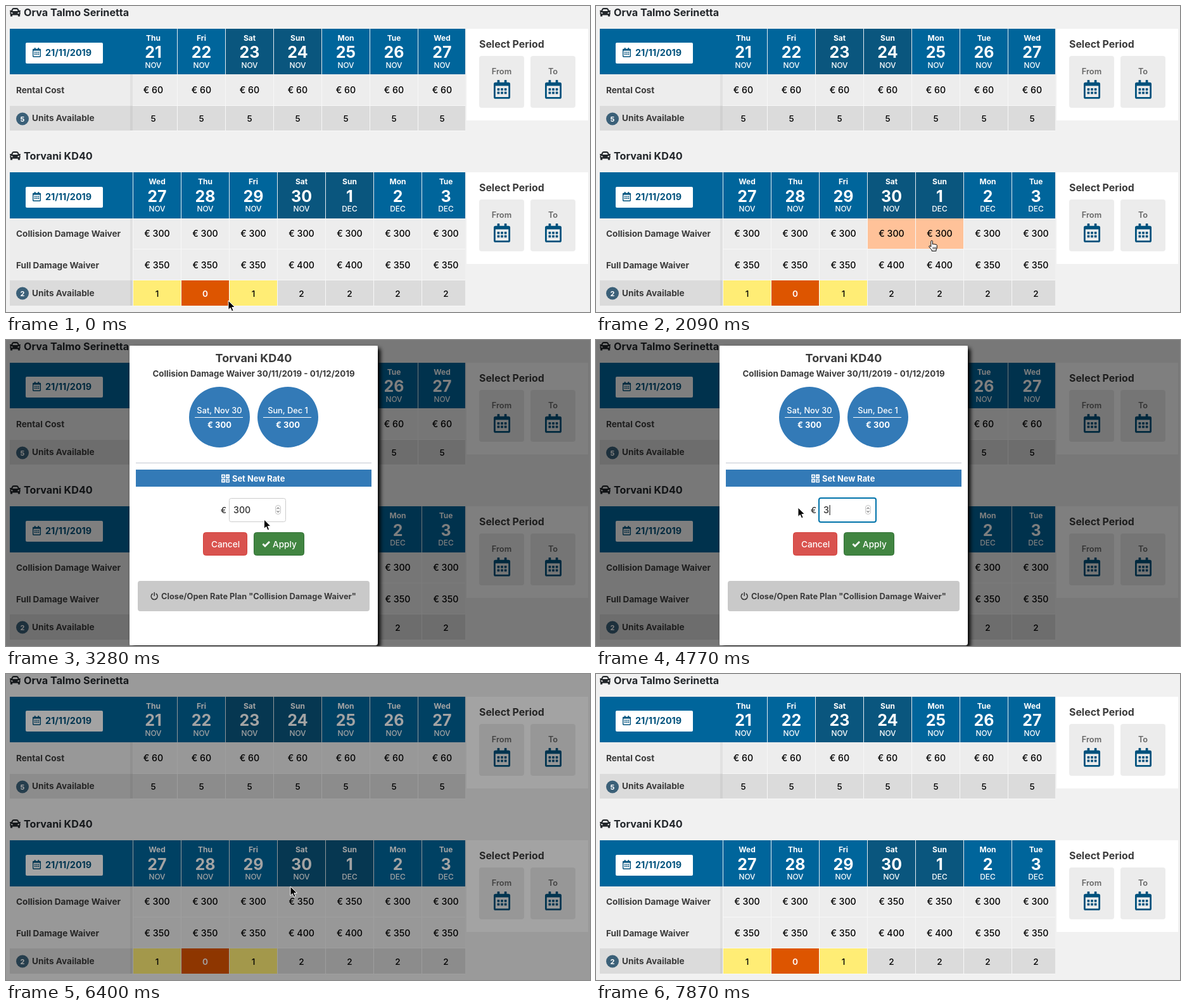
These frames come from a looping animation (922 px wide and 484 px high, 8.16 s). An HTML page:

```html
<!DOCTYPE html>
<html lang="en">
<head>
<meta charset="utf-8">
<title>Rental rate calendar</title>
<style>
html, body { margin: 0; width: 100%; height: 100%; overflow: hidden; background: #f1f1f1; }
svg { display: block; font-family: Inter, sans-serif; }
text { white-space: pre; }
</style>
</head>
<body>
<svg id="stage" width="922" height="484" viewBox="0 0 922 484"></svg>
<script>
const LOOP = 8160, COL = 76, CELLS_X = 201, RIGHT = 725;
const BLUE = '#00659b', WEEKEND = '#0a567e', INK = '#3b3b3b', MODAL_BLUE = '#337ab7';
const CAR = 'Torvani KD40', PLAN = 'Collision Damage Waiver';

const rect = (x, y, w, h, fill, extra = '') =>
  `<rect x="${x}" y="${y}" width="${w}" height="${h}" fill="${fill}" ${extra}/>`;
const text = (x, y, str, size, weight = 400, fill = '#000', anchor = 'start', id = '') =>
  `<text x="${x}" y="${y}" font-size="${size}" font-weight="${weight}" fill="${fill}" text-anchor="${anchor}" id="${id}">${str}</text>`;
const mid = (x, y, str, size, weight, fill, id) => text(x, y, str, size, weight, fill, 'middle', id);
const path = (d, fill, extra = '') => `<path d="${d}" fill="${fill}" ${extra}/>`;
const at = (x, y, scale, content) => `<g transform="translate(${x} ${y}) scale(${scale})">${content}</g>`;

const carIcon = path('M0 4h2.4l.7-1.8Q4 0 6.400 0h4.200Q13 0 13.900 2.200l.7 1.800H17v1.400h-1q.6.6.6 1.600v2.400q0 .8-.5 1.400v2.600h-3.200v-2H4.100v2H.9v-2.600Q.4 10 .4 9.400V7q0-1 .6-1.600H0z' +
  'M5 3 4.300 5h8.400L12 3q-.3-.8-1.200-.8H6.200Q5.300 2.200 5 3z' +
  'M2 7.700q.3-1 1.500-.6 1.400.8 1.200 2-3 .4-2.700-1.400zM15 7.700q-.3-1-1.500-.6-1.400.8-1.200 2 3 .4 2.700-1.400z', '#23272b', 'fill-rule="evenodd"');

function calendarIcon(x, y, scale) {
  const color = '#00527d';
  let s = rect(.75, 2.75, 12.5, 12.5, 'none', `rx=".8" stroke="${color}" stroke-width="1.5"`) + rect(.5, 2.5, 13, 2.5, color);
  for (const px of [3, 9]) s += rect(px, 0, 2, 3, color, 'rx=".4"');
  for (let i = 0; i < 6; i++) s += rect(3 + i % 3 * 3, 7 + (i > 2) * 3, 2, 2, color, 'rx=".35"');
  return at(x, y, scale, s);
}

// The page is built in two layers so that cell highlights sit below the text.
let shapes = '', labels = '';

function section(top, title, firstX, days, weekendCol, rows) {
  const headEnd = rows[0].y, headH = headEnd - top;
  labels += at(6, top - 33, 1, carIcon) + text(28, top - 20, title, 16.2, 700, '#23272b');
  shapes += rect(6, top, RIGHT - 6, headH, BLUE);
  const colX = c => firstX + c * COL;
  days.forEach(([day, num, month], c) => {
    const x = colX(c), cx = x + 37.5;
    if (c == weekendCol || c == weekendCol + 1) shapes += rect(x, top, COL - 1, headH, WEEKEND);
    if (x > 200) shapes += rect(x - 1, top, 1, headH, '#e4ecf1');
    labels += mid(cx, top + 19, day, 12, 700, '#fff') + mid(cx, headEnd - 26.5, num, 25, 700, '#fff') +
      mid(cx, top + 62, month, 11.9, 500, '#fff');
  });
  shapes += rect(31, headEnd - 50, 122, 33, '#fff', 'rx="2"');
  labels += calendarIcon(42, headEnd - 42, .93) + text(62, headEnd - 29, '21/11/2019', 14.4, 700, '#00527d');

  rows.forEach(({ name, y, h, base, values, badge }, r) => {
    const fill = badge ? '#dbdbdb' : '#ededed';
    shapes += rect(196, y, RIGHT - 196, h + 1, '#f7f7f7');
    values.forEach((value, c) => {
      const x = colX(c);
      const tint = badge == 2 && ['#ffed75', '#dd5500', '#ffed75'][c] || fill;
      shapes += rect(x, y, Math.min(COL - 1, RIGHT - x), h, tint);
      labels += mid(x + 37.5, base, value, badge ? 13.6 : 14.2,
        value === 0 ? 600 : 500, value === 0 ? '#fff' : '#000', badge ? '' : `v${top}-${r}-${c}`);
    });
    shapes += rect(6, y, 194, h + (badge ? 0 : 1), fill) + rect(196, y, 4, h + (badge ? 0 : 1), '#000', 'opacity=".05"');
    if (badge) {
      labels += `<circle cx="26" cy="${y + 20.5}" r="10" fill="#3b6078"/>` + mid(26, y + 24.5, badge, 11, 700, '#fff');
    }
    labels += text(badge ? 41 : 16, badge ? base - 1 : base, name, 13.6, 700, INK);
  });

  shapes += rect(727, top, 192, 145, '#fff');
  labels += text(747, top + 30, 'Select Period', 15.9, 700, INK);
  ['From', 'To'].forEach((name, i) => {
    const x = 747 + i * 81;
    shapes += rect(x, top + 43, 71, 82, '#ececec', 'rx="4"');
    labels += mid(x + 35.5, top + 72, name, 12.8, 600, '#666') + calendarIcon(x + 23, top + 81, 1.86);
  });
}

const week = (names, first, month) => names.split(' ').map((d, i) => [d, first + i, month]);
const nov = week('Thu Fri Sat Sun Mon Tue Wed', 21, 'NOV');
const turn = [...week('Wed Thu Fri Sat', 27, 'NOV'), ...week('Sun Mon Tue', 1, 'DEC')];

section(36, 'Orva Talmo Serinetta', 195, nov, 2, [
  { name: 'Rental Cost', y: 108, h: 49, base: 138, values: Array(7).fill('€ 60') },
  { name: 'Units Available', y: 158, h: 39, base: 183, values: Array(7).fill(5), badge: 5 }
]);
section(263, CAR, CELLS_X, turn, 3, [
  { name: PLAN, y: 336, h: 48, base: 365, values: Array(7).fill('€ 300') },
  { name: 'Full Damage Waiver', y: 385, h: 48, base: 415, values: turn.map((d, c) => c == 3 || c == 4 ? '€ 400' : '€ 350') },
  { name: 'Units Available', y: 434, h: 40, base: 460, values: [1, 0, 1, 2, 2, 2, 2], badge: 2 }
]);

const dayCircle = (x, label) => `<circle cx="${x}" cy="122" r="48" fill="${MODAL_BLUE}"/>` +
  mid(x, 116, label, 12.8, 500, '#fff') + rect(x - 39, 122, 76, 1, '#fff') + mid(x, 139, '€ 300', 13, 700, '#fff');
const stroke = (color, width) => `stroke="${color}" stroke-width="${width}" stroke-linecap="round"`;
const rateIcon = [0, 1, 2, 3].map(i => rect(340 + i % 2 * 7, 212.5 + (i > 1) * 7, 6, 6, '#fff', 'rx=".8"')).join('') +
  path('M341.500 215.500h3M343 214v3M348.500 215.500h3M341.800 221.300l2.400 2.400M344.200 221.300l-2.400 2.400M348.500 221.500h3M348.500 223.500h3', 'none', stroke(MODAL_BLUE, 1));

const modal = rect(195, 9, 392, 474, '#fff', 'rx="4" style="filter:drop-shadow(4px 4px 3px #000)"') +
  mid(391, 35, CAR, 18, 700, INK) +
  mid(391, 58, PLAN + ' 30/11/2019 - 01/12/2019', 13.3, 700, INK) +
  dayCircle(337, 'Sat, Nov 30') + dayCircle(445, 'Sun, Dec 1') +
  rect(205, 194, 372, 1, '#c3c7d0') +
  rect(205, 205, 372, 27, MODAL_BLUE) + rateIcon + text(357, 224, 'Set New Rate', 12.9, 700, '#fff') +
  text(339, 274, '€', 13.6, 500, '#333') + '<g id="field"></g>' +
  rect(425.5, 261.5, 8, 14, '#fafafa', `rx="3.500" ${stroke('#c8c8c8', 1)}`) +
  path('M427.800 267l1.700-2 1.700 2M427.800 270.500l1.700 2 1.700-2', 'none', stroke('#444', 1)) +
  rect(311.5, 304.5, 69, 36, '#d9534f', 'rx="4" stroke="#d43f3a"') + text(324, 328, 'Cancel', 13.6, 500, '#fff') +
  rect(391.5, 304.5, 79, 36, '#418541', 'rx="4" stroke="#2f6f33"') + text(421, 328, 'Apply', 13.6, 500, '#fff') +
  path('M405.500 322.500l3.500 3.500 7-7', 'none', `stroke="#fff" stroke-width="2.800"`) +
  rect(208, 381, 366, 48, '#c9c9c9', 'rx="4"') +
  path('M231.200 401.500a5 5 0 1 0 6 0M234.200 399.500v5', 'none', stroke(INK, 1.6)) +
  text(245, 410, `Close/Open Rate Plan "${PLAN}"`, 12.8, 700, INK);

const cursors = {
  arrow: path('M0 0v14.500l3.300-3.100 2.300 5.400 2.500-1.100-2.300-5.200h4.600z', '#000', 'stroke="#fff"'),
  hand: at(1, 1, 1, path('M-1.200 10V1.400a1.300 1.300 0 0 1 2.600 0V6q1.200-1 2.400 0 1.200-.8 2.300.3 1.600-.6 2.200 1V11q0 2-1.300 3.500V16.500H.2V15Q-2 12.500-4 10q-.6-1.400.6-1.800 1.100 0 2.200 1.800z', '#fff', 'stroke="#000" stroke-linejoin="round"') +
    path('M2.200 10.500v3M4.300 10.500v3M6.300 10.500v3', 'none', stroke('#000', .8))),
  beam: path('M-3-8q3 0 3 2V6q0 2-3 2M3-8q-3 0-3 2M3 8q-3 0-3-2', 'none', stroke('#000', 1.2))
};

const $ = id => document.getElementById(id);
$('stage').innerHTML = rect(0, 0, 922, 484, '#f1f1f1') + shapes + '<g id="marks"></g>' + labels +
  '<path id="dim" fill-rule="evenodd"/>' + `<g id="modal">${modal}</g><g id="cursor"></g>`;

// Each burst of action: start, end, number of steps; then the steps that move the pointer and where to.
const actions = {
  approach: [450, 1050, 5, 0, 4, 462, 358],
  select:   [1640, 2090, 4, 1, 3, 529, 370],
  open:     [2540, 3570, 8, 3, 6, 385, 268],
  mark:     [3720, 4020, 3, 1, 2, 319, 265],
  type:     [4770, 5210, 4, 0, 0, 319, 265],
  apply:    [5510, 6100, 5, 0, 2, 449, 336],
  reveal:   [6400, 7280, 7, 3, 6, 468, 362],
  leave:    [7580, 7870, 3, 0, 1, 812, 471]
};

function stepOf(t, [start, end, count]) {
  if (t < start) return -1;
  return Math.min(count - 1, Math.floor((t - start + 10) / ((end - start) / (count - 1))));
}

function render(now) {
  const t = now % LOOP, k = {};
  let x = 351, y = 466;
  for (const name in actions) {
    const [, , , from, to, tx, ty] = actions[name];
    k[name] = stepOf(t, actions[name]);
    const p = Math.max(0, Math.min(1, (k[name] - from + 1) / (to - from + 1)));
    const ease = p * p * (3 - 2 * p);
    x += (tx - x) * ease;
    y += (ty - y) * ease;
  }

  const saved = k.apply >= 4;
  const blocked = k.open >= 0 && k.reveal < 2;
  const col = Math.floor((x - CELLS_X) / COL), row = Math.floor((y - 336) / 49);
  const overCell = !blocked && col >= 0 && col < 7 && (row == 0 || row == 1);

  let marks = '';
  const mark = (c, r, fill) => marks += rect(CELLS_X + c * COL, 336 + r * 49, COL - 1, 48, fill);
  if (k.select >= 0 && !saved) {
    const last = k.open >= 0 ? 4 : col;
    for (let c = 3; c <= last; c++) mark(c, 0, '#ffc299');
  } else if (overCell) mark(col, row, '#c5dcea');
  $('marks').innerHTML = marks;
  for (const c of [3, 4]) $(`v263-0-${c}`).textContent = saved ? '€ 350' : '€ 300';

  const dim = k.reveal >= 0 ? [.36, .1][k.reveal] ?? 0 : k.open >= 0 ? [.08, .36][k.open] ?? .5 : 0;
  const hole = k.apply < 3 ? 'M195 9h392v474h-392z' : '';
  $('dim').setAttribute('d', 'M0 0h922v484H0z' + hole);
  $('dim').setAttribute('opacity', dim);
  const fade = k.apply >= 3 ? (k.apply == 3 ? .4 : 0) : k.open >= 0 ? [.1, .7][k.open] ?? 1 : 0;
  $('modal').setAttribute('opacity', fade);

  const focused = k.mark >= 0, typed = k.type >= 0;
  const value = typed ? '350'.slice(0, k.type + 1) : '300';
  let field = focused ? rect(352, 250, 90, 38, '#fff', 'rx="3" stroke="#0073aa" stroke-width="2"')
    : rect(352.5, 250.5, 89, 37, '#fff', 'rx="3" stroke="#ccc"');
  if (focused && !typed && k.mark > 0) {
    const left = Math.max(359, x);
    field += rect(left, 259, 386 - left, 20, '#b3d7ff');
  }
  if (typed && k.type < 3) field += rect(359.5 + 9.1 * value.length, 261, 1, 16, '#000');
  $('field').innerHTML = field + text(359, 274, value, 14.2, 500, '#333');

  const inField = k.open >= 6 && !typed, onApply = k.apply == 2;
  const kind = inField ? 'beam' : overCell || onApply ? 'hand' : 'arrow';
  $('cursor').innerHTML = k.leave == 2 ? '' : at(x, y, 1, cursors[kind]);
}

function loop() {
  render(performance.now());
  requestAnimationFrame(loop);
}
loop();
</script>
</body>
</html>
```
